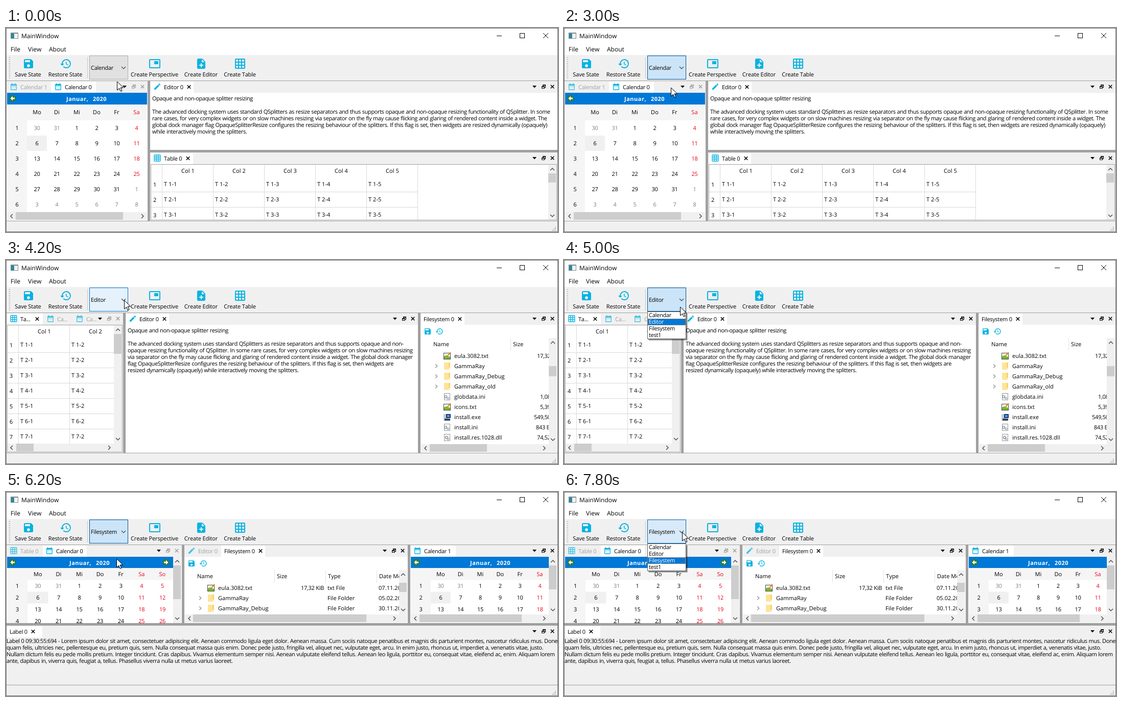
Animation, 1080 px wide and 400 px high, one loop 8000 ms. Source, as an HTML page with a canvas:

```html
<!DOCTYPE html>
<html lang="en">
<head>
<meta charset="utf-8">
<title>Dock perspectives</title>
<style>
html, body { margin: 0; width: 100%; height: 100%; overflow: hidden; background: #f0f0f0; }
canvas { display: block; width: 1080px; height: 400px; }
</style>
</head>
<body>
<canvas id="stage" width="1080" height="400"></canvas>
<script>
const ctx = document.getElementById('stage').getContext('2d');
const LOOP = 8000, STEP = 200;
const CYAN = '#06b3e3', BLUE = '#0078d7', PANEL = '#f0f0f0', GREY = '#a0a0a0', WHITE = '#fff', BLACK = '#000';

// [font, letter spacing, word spacing]
const family = '"Open Sans", "Noto Sans", sans-serif';
const FONT = {
  menu: ['12px ' + family, 0, 0],
  tool: ['11px ' + family, -0.15, 0],
  ui: ['11px ' + family, -0.27, 0],
  cell: ['11px ' + family, 0.05, 0],
  body: ['11px ' + family, -0.39, 0.45],
  bold: ['bold 11px ' + family, 0.5, 0]
};

// Icons on a 24 unit grid
const ICON = {
  save: 'M5 3h12l4 4v12a2 2 0 0 1-2 2H5a2 2 0 0 1-2-2V5a2 2 0 0 1 2-2zM5 5v4h10V5zM12 13a3 3 0 1 0 .01 0z',
  restore: 'M13 3a9 9 0 0 0-9 9H1l4 4 4-4H6a7 7 0 1 1 2 5l-1.4 1.4A9 9 0 1 0 13 3zM12 8v5l4.3 2.5.7-1.2-3.5-2V8z',
  view: 'M3 3h18a2 2 0 0 1 2 2v14a2 2 0 0 1-2 2H3a2 2 0 0 1-2-2V5a2 2 0 0 1 2-2zM3 5v14h18V5zM11 7h8v6h-8z',
  note: 'M6 2h8l6 6v12a2 2 0 0 1-2 2H6a2 2 0 0 1-2-2V4a2 2 0 0 1 2-2zM13 3.5V9h5.5zM11 11v3H8v2h3v3h2v-3h3v-2h-3v-3z',
  pencil: 'M3 17.2V21h3.8L17.8 9.9 14 6.2zM15.1 5.1l2-2h1.2l2.7 2.7v1l-2.1 2z',
  date: 'M5 4h1V2h2v2h8V2h2v2h1a2 2 0 0 1 2 2v14a2 2 0 0 1-2 2H5a2 2 0 0 1-2-2V6a2 2 0 0 1 2-2zM5 9v11h14V9zM7 11h2v2H7zM11 11h2v2h-2zM15 11h2v2h-2z',
  grid: 'M4 2h16a2 2 0 0 1 2 2v16a2 2 0 0 1-2 2H4a2 2 0 0 1-2-2V4a2 2 0 0 1 2-2z'
};
for (let i = 0; i < 9; i++) ICON.grid += `M${4 + i % 3 * 6} ${4 + Math.floor(i / 3) * 6}h4v4h-4z`;
for (const k in ICON) ICON[k] = new Path2D(ICON[k]);
const ARROW = new Path2D('M0 0V17L4 13L6.7 19L9.3 18L6.6 12H12Z');

function rect(x, y, w, h, fill) {
  ctx.fillStyle = fill;
  ctx.fillRect(x, y, w, h);
}

function frame(x, y, w, h, color) {
  ctx.strokeStyle = color;
  ctx.lineWidth = 1;
  ctx.strokeRect(x + .5, y + .5, w - 1, h - 1);
}

function line(points, color, width = 1) {
  ctx.strokeStyle = color;
  ctx.lineWidth = width;
  ctx.beginPath();
  points.forEach(([x, y]) => ctx.lineTo(x, y));
  ctx.stroke();
}

function poly(points, fill) {
  ctx.fillStyle = fill;
  ctx.beginPath();
  points.forEach(([x, y]) => ctx.lineTo(x, y));
  ctx.fill();
}

function text(s, x, y, font = FONT.ui, color = BLACK, align = 'left') {
  ctx.font = font[0];
  ctx.letterSpacing = font[1] + 'px';
  ctx.wordSpacing = font[2] + 'px';
  ctx.textRendering = 'geometricPrecision';
  ctx.fontKerning = 'none';
  ctx.fillStyle = color;
  ctx.textAlign = align;
  ctx.fillText(s, x, y);
}

function clipped(x, y, r, b, draw) {
  ctx.save();
  ctx.beginPath();
  ctx.rect(x, y, r - x, b - y);
  ctx.clip();
  draw();
  ctx.restore();
}

function icon(name, x, y, size = 16, alpha = 1) {
  ctx.save();
  ctx.translate(x, y);
  ctx.scale(size / 24, size / 24);
  ctx.globalAlpha = alpha;
  ctx.fillStyle = CYAN;
  ctx.fill(ICON[name], 'evenodd');
  ctx.restore();
}

function chevron(x, y, turn, color = '#505050', s = 4, width = 1.5) {
  ctx.save();
  ctx.translate(x, y);
  ctx.rotate(turn * Math.PI / 2);
  line([[-s / 2, -s], [s / 2, 0], [-s / 2, s]], color, width);
  ctx.restore();
}

function cross(x, y, s, color, width = 1.6) {
  line([[x - s, y - s], [x + s, y + s]], color, width);
  line([[x - s, y + s], [x + s, y - s]], color, width);
}

function vbar(x, y, h, ty, th) {
  rect(x, y, 16, h, PANEL);
  chevron(x + 8, y + 9, 3);
  chevron(x + 8, y + h - 9, 1);
  rect(x, ty, 15, th, '#cdcdcd');
}

function hbar(x, y, w, tx, tw) {
  rect(x, y, w, 16, PANEL);
  chevron(x + 9, y + 8, 2);
  chevron(x + w - 9, y + 8, 0);
  rect(tx, y, tw, 15, '#cdcdcd');
}

// tab: { s, x, icon, from, to, close }; "from" marks the active tab
function dock(x, y, r, b, tabs, muted) {
  rect(x, y, r - x, b - y, WHITE);
  rect(x, y, r - x, 23, PANEL);
  for (const t of tabs) {
    const active = t.from !== undefined;
    if (active) rect(t.from, y + 1, t.to - t.from, 22, WHITE);
    if (t.icon) icon(t.icon, t.x - 21, y + 3, 16, active ? 1 : .75);
    text(t.s, t.x, y + 16, FONT.ui, active ? BLACK : GREY);
    if (t.close) cross(t.close, y + 11.5, 3.2, BLACK);
  }
  const c = muted ? GREY : BLACK, m = y + 11;
  poly([[r - 49, m - 2], [r - 41, m - 2], [r - 45, m + 2.5]], BLACK);
  frame(r - 29, m - 4, 6, 6, c);
  rect(r - 29, m - 4, 6, 2, c);
  rect(r - 31, m - 1, 6, 5, PANEL);
  frame(r - 31, m - 1, 6, 5, c);
  rect(r - 31, m - 1, 6, 2, c);
  cross(r - 10, m, 3.2, c);
}

function goButton(x, y, dir) {
  ctx.fillStyle = '#2f7d32';
  ctx.beginPath();
  ctx.arc(x, y, 6.5, 0, 7);
  ctx.fill();
  poly([[x + 4.5 * dir, y], [x, y - 4.5], [x, y - 1.5], [x - 4 * dir, y - 1.5], [x - 4 * dir, y + 1.5], [x, y + 1.5], [x, y + 4.5]], WHITE);
}

const DAYS = ['Mo', 'Di', 'Mi', 'Do', 'Fr', 'Sa', 'So'];

function calendar(x, r, b, o) {
  clipped(x, 127, r, b, () => {
    rect(x, 127, r - x, b - 127, WHITE);
    rect(x, 127, o.left - x, b - 127, '#f5f5f5');
    rect(x, 127, r - x, o.top - 127, '#f5f5f5');
    rect(x, 127, r - x, o.bar, BLUE);
    text('Januar,', o.title, 143, FONT.bold, WHITE);
    text('2020', o.title + 52, 143, FONT.bold, WHITE);
    goButton(x + 11, 138, -1);
    if (o.cols === 7) goButton(r - 14, 138, 1);
    rect(o.left, o.top + o.row, o.col, o.row, PANEL);
    for (let c = 0; c < o.cols; c++) {
      const cx = o.left + o.col * (c + .5), red = c > 4 ? '#e8001c' : BLACK;
      text(DAYS[c], cx, o.head + 4, FONT.cell, red, 'center');
      for (let w = 0; w < 6; w++) {
        const n = w * 7 + c - 1, other = n < 1 || n > 31;
        const day = n < 1 ? n + 31 : n > 31 ? n - 31 : n;
        text(day, cx, o.top + o.row * (w + .5) + 4, FONT.ui, other ? '#808080' : red, 'center');
      }
    }
    for (let w = 0; w < 6; w++) text(w + 1, (x + o.left) / 2, o.top + o.row * (w + .5) + 4, FONT.ui, BLACK, 'center');
  });
}

function table(x, y, r, b, cols) {
  clipped(x, y, r, b, () => {
    const grid = '#d9d9d9', left = x + 22, top = y + 24, right = left + cols * 100;
    rect(x, y, r - x, b - y, WHITE);
    for (let c = 0; c <= cols; c++) rect(left + c * 100, y + 1, 1, b - y, grid);
    for (let c = 0; c < cols; c++) text('Col ' + (c + 1), left + 51 + c * 100, y + 17, FONT.cell, BLACK, 'center');
    for (let n = 0; top + n * 30 < b; n++) {
      const base = top + n * 30 + 19;
      if (n) rect(x, top + n * 30, right - x, 1, grid);
      text(n + 1, x + 8, base + 1, FONT.ui, BLACK, 'center');
      for (let c = 0; c < cols; c++) text(`T ${n + 1}-${c + 1}`, left + 4 + c * 100, base, FONT.cell);
    }
  });
}

const FILES = [
  ['eula.3082.txt', 'txt', '17,32 KiB', 'txt File', '07.11.2007'],
  ['GammaRay', 'dir', '', 'File Folder', '05.02.2019'],
  ['GammaRay_Debug', 'dir', '', 'File Folder', '30.11.2018'],
  ['GammaRay_old', 'dir', ''],
  ['globdata.ini', 'ini', '1,08 KiB'],
  ['icons.txt', 'txt', '5,39 KiB'],
  ['install.exe', 'exe', '549,50 KiB'],
  ['install.ini', 'ini', '843 Bytes'],
  ['install.res.1028.dll', 'dll', '74,52 KiB'],
  ['install.res.1031.dll', 'dll', '94,52 KiB']
];

function gear(x, y, s) {
  ctx.strokeStyle = '#8393a3';
  ctx.lineWidth = s * .6;
  ctx.beginPath();
  ctx.arc(x, y, s, 0, 7);
  ctx.stroke();
}

function fileIcon(kind, x, y) {
  if (kind === 'dir') {
    rect(x - 6, y - 7, 12, 14, '#f5d477');
    rect(x - 6, y - 7, 9, 14, '#ffe497');
    rect(x + 3, y + 3, 3, 4, '#ffedb8');
  } else if (kind === 'exe') {
    rect(x - 7, y - 6, 8, 13, '#c5ccd6');
    rect(x - 2, y - 6, 9, 8, '#173b7a');
    rect(x, y - 4, 5, 4, '#5d9be0');
    rect(x - 5, y + 3, 11, 4, '#35445c');
  } else if (kind === 'txt') {
    rect(x - 7, y - 6, 14, 13, '#fdfdf8');
    poly([[x - 6, y + 1], [x - 2, y - 1], [x + 6, y + 2], [x + 6, y + 6], [x - 6, y + 6]], '#76b92f');
    frame(x - 7, y - 6, 14, 13, '#444');
    line([[x - 1, y + 2], [x + 7, y - 7]], '#d58a22', 2);
  } else {
    rect(x - 6, y - 7, 12, 14, '#fbfbfb');
    frame(x - 6, y - 7, 12, 14, '#9a9a9a');
    gear(x - (kind === 'ini' ? 3 : 1), y, 2.4);
    gear(x + 2, y + 3, 1.8);
  }
}

function tree(x, r, b) {
  icon('save', x - 19, 132);
  icon('restore', x + 4, 132);
  clipped(x - 24, 150, r, b, () => {
    ['Name', 'Size', 'Type', 'Date Modified'].forEach((s, i) => {
      text(s, x + (i ? 56 + i * 100 : 0), 169, FONT.cell);
      if (i) rect(x + 51 + i * 100, 153, 1, 25, '#e2e2e2');
    });
    FILES.forEach(([name, kind, size, type = '', date = ''], i) => {
      const y = 188 + i * 20;
      if (kind === 'dir') chevron(x + 6, y, 0, '#8a8a8a', 3.5, 1.2);
      fileIcon(kind, x + 27, y);
      text(name, x + 41, y + 4, FONT.cell);
      text(size, x + 248, y + 4, FONT.ui, BLACK, 'right');
      text(type, x + 255, y + 4, FONT.cell);
      text(date, x + 355, y + 4, FONT.cell);
    });
  });
}

function lines(list, x, y) {
  list.forEach((s, i) => text(s, x, y + i * 13, FONT.body));
}

const HEADING = 'Opaque and non-opaque splitter resizing';
const WIDE = [
  'The advanced docking system uses standard QSplitters as resize separators and thus supports opaque and non-opaque resizing functionality of QSplitter. In some',
  'rare cases, for very complex widgets or on slow machines resizing via separator on the fly may cause flicking and glaring of rendered content inside a widget. The',
  'global dock manager flag OpaqueSplitterResize configures the resizing behaviour of the splitters. If this flag is set, then widgets are resized dynamically (opaquely)',
  'while interactively moving the splitters.'
];
const NARROW = [
  'The advanced docking system uses standard QSplitters as resize separators and thus supports opaque and non-',
  'opaque resizing functionality of QSplitter. In some rare cases, for very complex widgets or on slow machines resizing',
  'via separator on the fly may cause flicking and glaring of rendered content inside a widget. The global dock manager',
  'flag OpaqueSplitterResize configures the resizing behaviour of the splitters. If this flag is set, then widgets are',
  'resized dynamically (opaquely) while interactively moving the splitters.'
];
const LOREM = [
  'Label 0 09:30:55:694 - Lorem ipsum dolor sit amet, consectetuer adipiscing elit. Aenean commodo ligula eget dolor. Aenean massa. Cum sociis natoque penatibus et magnis dis parturient montes, nascetur ridiculus mus. Donec',
  'quam felis, ultricies nec, pellentesque eu, pretium quis, sem. Nulla consequat massa quis enim. Donec pede justo, fringilla vel, aliquet nec, vulputate eget, arcu. In enim justo, rhoncus ut, imperdiet a, venenatis vitae, justo.',
  'Nullam dictum felis eu pede mollis pretium. Integer tincidunt. Cras dapibus. Vivamus elementum semper nisi. Aenean vulputate eleifend tellus. Aenean leo ligula, porttitor eu, consequat vitae, eleifend ac, enim. Aliquam lorem',
  'ante, dapibus in, viverra quis, feugiat a, tellus. Phasellus viverra nulla ut metus varius laoreet.'
];

function calendarView() {
  dock(1, 104, 277, 378, [
    { s: 'Calendar 1', x: 28, icon: 'date' },
    { s: 'Calendar 0', x: 115, icon: 'date', from: 88, to: 176 }
  ], true);
  calendar(2, 276, 361, { left: 41, col: 39, cols: 6, top: 181, row: 30, head: 165, bar: 23, title: 118 });
  hbar(2, 361, 274, 19, 210);

  dock(282, 104, 1079, 239, [{ s: 'Editor 0', x: 309, icon: 'pencil', from: 283, to: 367, close: 358 }]);
  text(HEADING, 286, 142, FONT.body);
  lines(WIDE, 286, 168);

  dock(282, 244, 1079, 378, [{ s: 'Table 0', x: 309, icon: 'grid', from: 283, to: 366, close: 356 }]);
  table(283, 267, 1061, 377, 5);
  vbar(1061, 268, 109, 285, 18);
  frame(283, 267, 795, 110, GREY);
}

function editorView() {
  dock(1, 104, 229, 378, [
    { s: 'Ta...', x: 28, icon: 'grid', from: 2, to: 72, close: 61 },
    { s: 'Ca...', x: 100, icon: 'date' },
    { s: 'Ca...', x: 157, icon: 'date' }
  ], true);
  rect(178, 106, 13, 18, PANEL);
  poly([[180, 113], [188, 113], [184, 117.5]], BLACK);
  rect(2, 127, 226, 250, PANEL);
  table(2, 127, 211, 360, 2);
  vbar(211, 128, 232, 145, 39);
  hbar(2, 360, 209, 20, 34);
  frame(2, 127, 226, 250, GREY);

  dock(234, 104, 806, 378, [{ s: 'Editor 0', x: 261, icon: 'pencil', from: 235, to: 319, close: 310 }]);
  text(HEADING, 238, 142, FONT.body);
  lines(NARROW, 238, 168);

  dock(811, 104, 1079, 378, [{ s: 'Filesystem 0', x: 817, from: 812, to: 897, close: 888 }]);
  rect(1062, 360, 16, 17, PANEL);
  tree(836, 1062, 361);
  vbar(1062, 153, 208, 208, 20);
  hbar(812, 361, 250, 829, 112);
}

function filesystemView() {
  const small = { top: 172.5, row: 23, head: 161, bar: 22 };
  dock(1, 104, 344, 257, [
    { s: 'Table 0', x: 28, icon: 'grid' },
    { s: 'Calendar 0', x: 98, icon: 'date', from: 72, to: 158 }
  ], true);
  calendar(2, 327, 257, { ...small, left: 42, col: 40.6, cols: 7, title: 124 });
  vbar(327, 127, 130, 144, 66);

  dock(349, 104, 786, 257, [
    { s: 'Editor 0', x: 376, icon: 'pencil' },
    { s: 'Filesystem 0', x: 427, from: 421, to: 507, close: 498 }
  ]);
  tree(374, 769, 240);
  rect(769, 240, 16, 16, PANEL);
  vbar(769, 153, 87, 178, 18);
  hbar(350, 240, 419, 366, 339);

  dock(791, 104, 1079, 257, [{ s: 'Calendar 1', x: 818, icon: 'date', from: 792, to: 880 }]);
  calendar(792, 1062, 240, { ...small, left: 831, col: 38.8, cols: 6, title: 908 });
  rect(1062, 240, 16, 17, PANEL);
  vbar(1062, 127, 113, 144, 47);
  hbar(792, 240, 270, 809, 200);

  dock(1, 262, 1079, 378, [{ s: 'Label 0', x: 7, from: 2, to: 71, close: 53 }]);
  rect(1, 285, 1078, 93, PANEL);
  lines(LOREM, 1, 296);
}

const VIEWS = [calendarView, editorView, filesystemView];
const ITEMS = ['Calendar', 'Editor', 'Filesystem', 'test1'];

function chrome() {
  rect(0, 0, 1080, 400, PANEL);
  rect(1, 1, 1078, 52, WHITE);
  rect(9, 9, 15, 12, '#7f8a90');
  rect(10, 11, 13, 9, '#eef4f4');
  rect(10, 11, 6, 9, '#2b8a99');
  text('MainWindow', 30, 20, FONT.menu);
  rect(960, 15, 10, 1, BLACK);
  frame(1005, 10, 10, 10, BLACK);
  cross(1056, 15, 5, BLACK, 1);
  text('File', 9, 46, FONT.menu);
  text('View', 43, 46, FONT.menu);
  text('About', 84, 46, FONT.menu);

  for (let y = 57; y < 99; y += 4) rect(6, y, 2, 2, '#c0c0c0');
  rect(159, 57, 1, 42, '#c8c8c8');
  [['Save State', 'save', 43], ['Restore State', 'restore', 116], ['Create Perspective', 'view', 290.5],
    ['Create Editor', 'note', 381.5], ['Create Table', 'grid', 457.5]].forEach(([s, name, x]) => {
    icon(name, Math.round(x) - 12 + (x < 200 ? 1 : 0), 58, 24);
    text(s, x, 95, FONT.tool, BLACK, 'center');
  });
  rect(1, 103, 1078, 276, GREY);
}

function statusBar() {
  rect(1, 379, 1078, 20, PANEL);
  for (let i = 0; i < 3; i++) {
    for (let j = 0; j <= i; j++) rect(1074 - j * 3, 390 + i * 3, 2, 2, '#bcbcbc');
  }
  frame(0, 0, 1080, 400, '#6e6e6e');
}

const PATH = [
  [0, 217, 105], [1000, 217, 105], [1400, 231, 79], [1600, 231, 78], [1800, 229, 86],
  [2200, 230, 75], [2800, 209, 117], [3400, 209, 117], [4000, 231, 78], [4200, 231, 79],
  [4800, 231, 79], [5600, 216, 131], [6200, 216, 131], [7000, 231, 78], [7200, 231, 79], [LOOP, 231, 79]
];

function pointer(t) {
  const i = PATH.findIndex(p => p[0] > t);
  const [t0, x0, y0] = PATH[i - 1], [t1, x1, y1] = PATH[i], k = (t - t0) / (t1 - t0);
  return [Math.round(x0 + (x1 - x0) * k), Math.round(y0 + (y1 - y0) * k)];
}

const within = (t, a, b) => t >= a && t < b;

function combo(t, view, y) {
  let fill = '#e1e1e1', edge = '#adadad';
  if (within(t, 1600, 3600) || within(t, 4600, 6400)) [fill, edge] = ['#cce4f7', '#005499'];
  else if (t >= 7800) [fill, edge] = ['#d8eaf9', '#0066b8'];
  else if (y < 101) [fill, edge] = ['#e5f1fb', BLUE];
  rect(163, 54, 76, 47, fill);
  frame(163, 54, 76, 47, edge);
  text(ITEMS[view], 166, 82);
  chevron(230, 78, 1, '#444', 4, 1.2);
}

function popup(view, y) {
  const on = y > 101 ? Math.floor((y - 102) / 13) : view;
  rect(166, 105, 76, 53, 'rgba(0,0,0,.22)');
  rect(165, 104, 76, 53, 'rgba(0,0,0,.3)');
  rect(163, 101, 76, 54, WHITE);
  frame(163, 101, 76, 54, '#646464');
  ITEMS.forEach((s, i) => {
    const top = 102 + i * 13;
    if (i === on) {
      rect(164, top, 74, 13, BLUE);
      ctx.setLineDash([1, 1]);
      frame(164, top, 74, 13, '#ff8728');
      ctx.setLineDash([]);
    }
    text(s, 166, top + 10, FONT.ui, i === on ? WHITE : BLACK);
  });
}

function cursor(x, y) {
  ctx.save();
  ctx.translate(x + .5, y);
  ctx.fillStyle = WHITE;
  ctx.strokeStyle = BLACK;
  ctx.lineWidth = 1;
  ctx.shadowColor = 'rgba(0,0,0,.3)';
  ctx.shadowBlur = 2;
  ctx.shadowOffsetX = ctx.shadowOffsetY = 1;
  ctx.fill(ARROW);
  ctx.shadowColor = 'transparent';
  ctx.stroke(ARROW);
  ctx.restore();
}

function draw(now) {
  const t = Math.floor(now % LOOP / STEP) * STEP;
  const view = t < 3400 ? 0 : t < 6200 ? 1 : 2;
  const [x, y] = pointer(t);
  chrome();
  VIEWS[view]();
  statusBar();
  combo(t, view, y);
  if (within(t, 1600, 3000) || within(t, 4600, 5800) || t >= 7800) popup(view, y);
  cursor(x, y);
}

let start;
function tick(now) {
  start ??= now;
  draw(now - start);
  requestAnimationFrame(tick);
}
draw(0);
requestAnimationFrame(tick);
</script>
</body>
</html>
```
